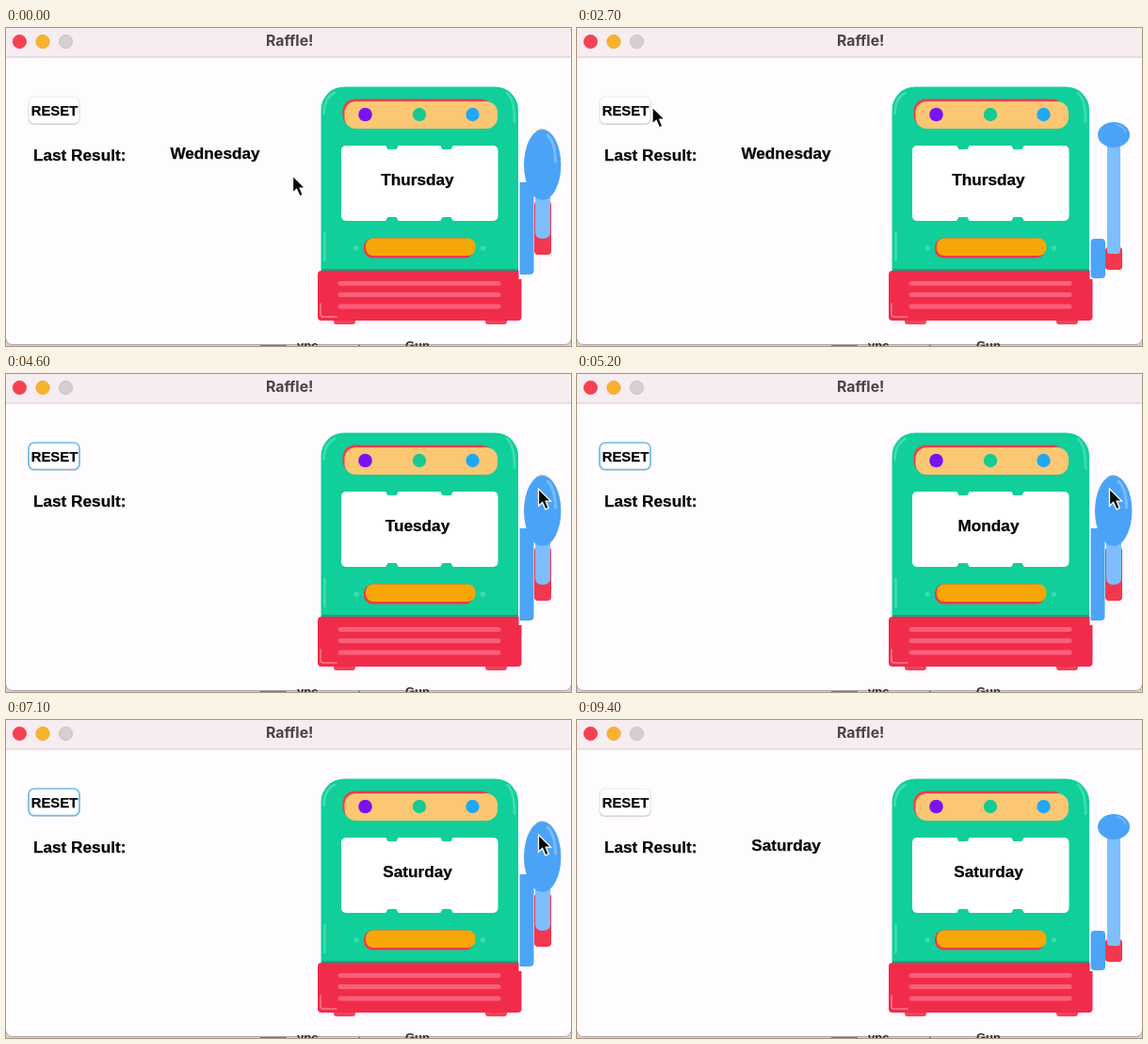
Write an HTML page that moves like this. It is 600 by 338 pixels and loops after 9.5 s.

```html
<!DOCTYPE html>
<html lang="en">
<head>
<meta charset="utf-8">
<title>Raffle!</title>
<style>
  html, body { margin: 0; width: 100%; height: 100%; overflow: hidden; background: #fefcff; }
  svg { display: block; width: 100vw; height: 100vh; }
  text { font: bold 17.2px "Liberation Sans", Arial, sans-serif; fill: #050505; stroke: #050505; stroke-width: .25; }
  .mid { text-anchor: middle; }
  .title { font: 700 15.8px Inter, sans-serif; fill: #4b4246; stroke: none; }
  .reset { font-size: 14.9px; }
  .scrap { font-size: 13px; fill: #333; stroke: none; }
  .line { fill: none; stroke-linecap: round; stroke-linejoin: round; }
</style>
</head>
<body>
<svg viewBox="0 0 600 338">
  <rect width="600" height="338" fill="#fefcff"/>
  <rect width="600" height="31" fill="#f7ecef"/>
  <path d="M0 31H600" stroke="#d3c9cc"/>
  <circle cx="14.4" cy="14.5" r="7.2" fill="#f54152" stroke="#e5384a" stroke-width=".6"/>
  <circle cx="39" cy="14.5" r="7.2" fill="#f8b22c" stroke="#e2a02a" stroke-width=".6"/>
  <circle cx="63.5" cy="14.5" r="7.1" fill="#d6cfd2" stroke="#c3bbbf" stroke-width=".8"/>
  <text class="mid title" x="301.2" y="19.4">Raffle!</text>

  <path d="M0 331Q1 336.5 7 336.5H593Q599 336.5 600 331V338H0Z" fill="#d5d2d4"/>
  <path class="line" d="M0 331Q1 336.5 7 336.5H593Q599 336.5 600 331" stroke="#aaa5a8"/>
  <path d="M270 337.5H298M374 337.5H376" stroke="#777"/>
  <text class="scrap" x="309" y="342">ync</text>
  <text class="scrap" x="424" y="342">Gun</text>

  <rect x="23.5" y="74" width="55" height="29" rx="6" fill="#d9d5d9"/>
  <rect id="button" x="24" y="73" width="54" height="28.5" rx="6" fill="#fff"/>
  <text class="mid reset" x="51.5" y="92.6">RESET</text>
  <text x="29" y="140.8">Last Result:</text>
  <text class="mid" id="last" x="222" y="139"></text>

  <g id="machine">
    <path d="M348 308H371V312Q371 315 368 315H351Q348 315 348 312ZM509 308H532V312Q532 315 529 315H512Q509 315 509 312Z" fill="#f5405a"/>
    <path d="M334.5 258V87A24.5 24.5 0 0 1 359 62.5H519.5A24.5 24.5 0 0 1 544 87V258Z" fill="#10cf9a"/>
    <path d="M335 257H544" stroke="#2a8f70" stroke-width="1.4"/>
    <path d="M335 258H544.5V267H547.5V307Q547.5 311 543.5 311H335Q331 311 331 307V262Q331 258 335 258Z" fill="#f02c4a"/>
    <path class="line" d="M355 271.5H523M355 283.5H523M355 296H523" stroke="#fa6079" stroke-width="5"/>
    <path class="line" d="M334 293V304Q334 307 337 307H351" stroke="#fa7b90" stroke-width="1.5"/>
    <path class="line" d="M337.5 91Q338 74 349 69M532 69Q540 75 540 100M338.5 218V247" stroke="#43dbb0" stroke-width="2.6"/>
    <rect x="357.5" y="75.5" width="160" height="30" rx="13" fill="#f23c4d"/>
    <rect x="359.5" y="78" width="162.5" height="29" rx="12" fill="#fbc773"/>
    <circle cx="381.5" cy="92" r="7.3" fill="#7912f5"/>
    <circle cx="439" cy="92" r="7.2" fill="#15ca91"/>
    <circle cx="495.5" cy="92" r="7.2" fill="#20a7f6"/>
    <rect x="356" y="125" width="166.5" height="80" rx="5" fill="#fff"/>
    <path d="M403 124.5H417L414.5 129H405.5ZM461 124.5H475L472.5 129H463.5ZM403 205.5H417L414.5 201H405.5ZM461 205.5H475L472.5 201H463.5Z" fill="#10cf9a"/>
    <rect x="380" y="223.5" width="117" height="21" rx="9" fill="#ed394c"/>
    <rect x="382" y="223.5" width="116.5" height="18.5" rx="8" fill="#f6a707"/>
    <circle cx="372" cy="234" r="2.8" fill="#39dcae"/>
    <circle cx="506.5" cy="234" r="2.8" fill="#39dcae"/>
  </g>
  <text class="mid" id="reel" x="437" y="167.3"></text>

  <g id="leverDown">
    <rect x="561" y="184" width="18" height="57" rx="4" fill="#f2384f"/>
    <path d="M545.5 164H560.5V258Q560.5 262 556 262H545.5Z" fill="#4ca4f7"/>
    <path d="M562 176H578V217Q578 224 570 224Q562 224 562 217Z" fill="#7dbeff"/>
    <path d="M562 110Q569 104 576 110Z" fill="#d8bd9d"/>
    <ellipse cx="569.7" cy="145.5" rx="19.7" ry="37.5" fill="#4ba3f7"/>
    <path class="line" d="M575 114Q583 121 583.5 142" stroke="#79bbfd" stroke-width="3"/>
  </g>
  <g id="leverUp">
    <rect x="561" y="233" width="18" height="24" rx="3.5" fill="#f2384f"/>
    <rect x="545.5" y="224" width="15.5" height="42" rx="4" fill="#4ca4f7"/>
    <path d="M563 121H577V237Q577 240 574 240H566Q563 240 563 237Z" fill="#7dbeff"/>
    <ellipse cx="570" cy="113.5" rx="17" ry="13.5" fill="#4ba3f7"/>
    <path class="line" d="M574 103Q581 105 582.5 111" stroke="#6fb6fd" stroke-width="2"/>
  </g>
  <path id="cursor" d="M0 0V18.2L4.1 14.4L7.4 21.8L10.8 20.4L7.7 13.1H13.1Z" fill="#080808" stroke="#fff" stroke-width="1.3"/>
</svg>
<script>
const LOOP = 9500, STEP = 100;
const DAYS = ["Monday", "Tuesday", "Wednesday", "Thursday", "Friday", "Saturday", "Sunday"];
const SPIN = { start: 4500, end: 7100 };
const RESET_AT = 3000, PULL_AT = 4400, RELEASE_AT = 7200;

// Pointer journeys: each stop is [time, x, y]; hidden outside them.
const JOURNEYS = [
  [[0, 304.5, 157], [700, 304.5, 157]],
  [[1700, 304.5, 157], [2500, 80, 84], [3200, 80, 84], [3900, 563, 125],
   [4300, 565.5, 122], [7500, 565.5, 122], [8500, 462, 275], [9000, 400, 340]]
];
const el = id => document.getElementById(id);
const show = (id, on) => el(id).setAttribute("visibility", on ? "visible" : "hidden");
const ease = u => u * u * (3 - 2 * u);

function pointerAt(t) {
  for (const stops of JOURNEYS) {
    for (let i = 1; i < stops.length; i++) {
      const [t0, x0, y0] = stops[i - 1], [t1, x1, y1] = stops[i];
      if (t < t0 || t >= t1) continue;
      const u = ease((t - t0) / (t1 - t0));
      return [x0 + (x1 - x0) * u, y0 + (y1 - y0) * u];
    }
  }
  return null;
}

function reelAt(t) {
  if (t < SPIN.start) return "Thursday";
  const turns = (Math.min(t, SPIN.end) - SPIN.start) / STEP;
  return DAYS[turns % DAYS.length];
}

function render(t) {
  const down = t < 2100 || (t >= PULL_AT && t < RELEASE_AT);
  const focused = t >= RESET_AT && t < RELEASE_AT;
  show("leverDown", down);
  show("leverUp", !down);
  el("reel").textContent = reelAt(t);
  el("last").textContent = t < RESET_AT ? "Wednesday" : t < RELEASE_AT ? "" : "Saturday";
  el("button").setAttribute("stroke", focused ? "#70bae9" : "#e6e2e6");
  el("button").setAttribute("stroke-width", focused ? 1.7 : 0.8);
  const at = pointerAt(t);
  show("cursor", at);
  if (at) el("cursor").setAttribute("transform", `translate(${at})`);
}

const began = performance.now();
function tick() {
  const t = (performance.now() - began) % LOOP;
  render(Math.floor(t / STEP) * STEP);
  requestAnimationFrame(tick);
}
tick();
</script>
</body>
</html>
```
